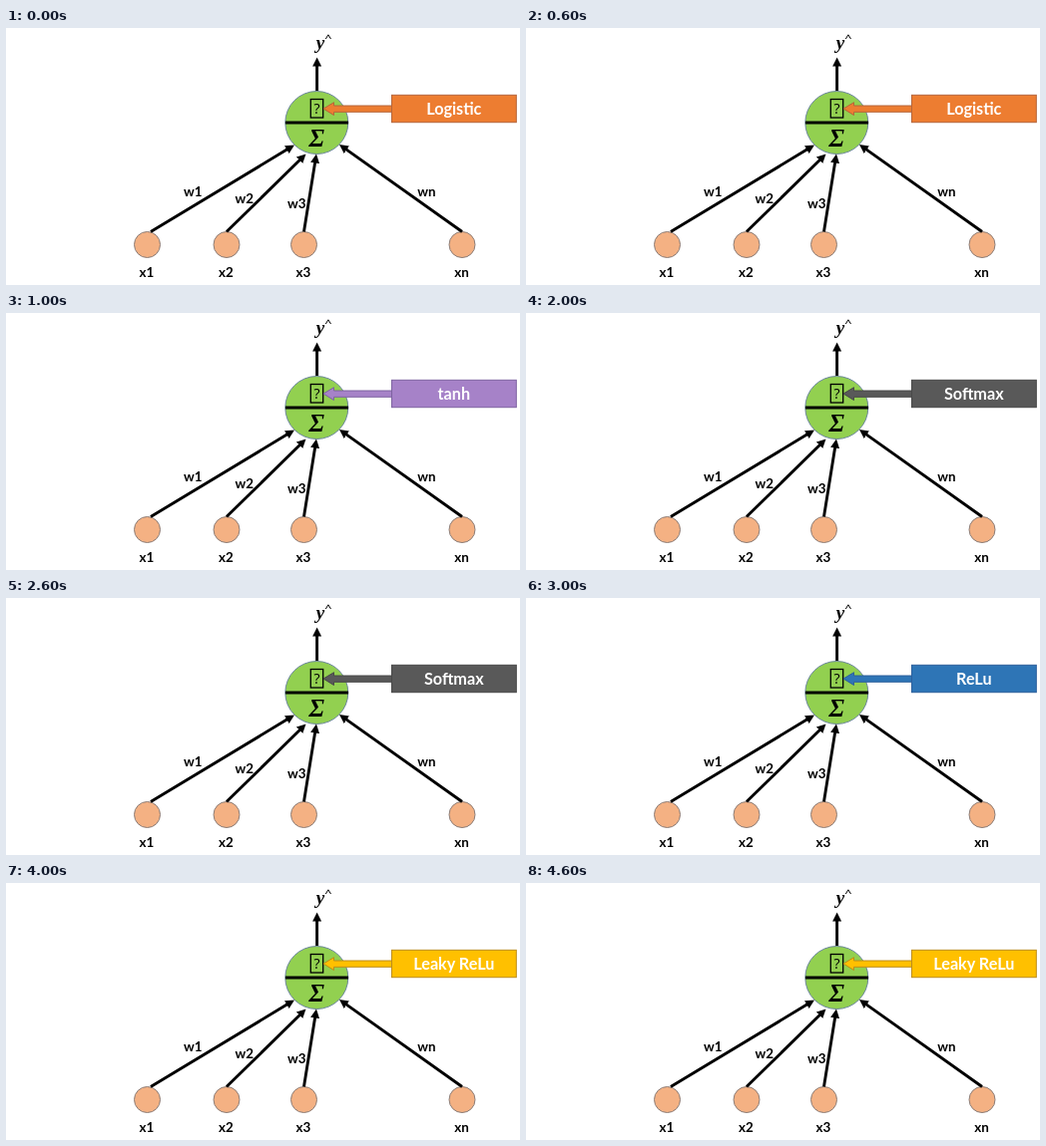
An HTML page that plays this animation: 515 by 258 pixels, repeating every 5000 ms.

```html
<!DOCTYPE html>
<html lang="en">
<head>
<meta charset="utf-8">
<title>Neuron activation functions</title>
<style>
  html, body { margin: 0; width: 100%; height: 100%; overflow: hidden; background: #fff; }
  svg { display: block; width: 515px; height: 258px; }
  text { font: 700 13.4px Lato, Carlito, sans-serif; text-anchor: middle; }
  .math { font: italic 700 19px "Liberation Serif", serif; }
  #label { font-size: 16.2px; fill: #fff; }
</style>
</head>
<body>
<svg viewBox="0 0 515 258">
  <defs>
    <marker id="head" markerUnits="userSpaceOnUse" markerWidth="10" markerHeight="10" refX="9" refY="5" orient="auto">
      <path d="M0 0.5L9 5L0 9.5z"/>
    </marker>
  </defs>

  <circle cx="311.3" cy="95" r="31.5" fill="#92d050" stroke="#6b8799"/>
  <path d="M280 95H343" stroke="#000" stroke-width="3"/>
  <g id="inputs" fill="#f4b183" stroke="#8b7d78"></g>
  <g id="arrows" stroke="#000" stroke-width="2.9"></g>
  <g id="names"></g>

  <text class="math" x="315" y="21">y</text>
  <path d="M320.3 11L322.9 6.8L325.5 11" fill="none" stroke="#000"/>
  <text class="math" x="311.3" y="119" style="font-size:25px">Σ</text>
  <rect x="305.3" y="71.5" width="12.4" height="18.5" fill="none" stroke="#000" stroke-width="1.3"/>
  <text x="311.5" y="86" style="font:400 14px 'Open Sans',sans-serif">?</text>

  <g id="callout">
    <path d="M318 81L328.5 74.7V78H386.5V84.3H328.5V87.5z"/>
    <rect x="386.5" y="67.3" width="124.8" height="27.4"/>
  </g>
  <text id="label" x="448.8" y="87"></text>
</svg>
<script>
const get = id => document.getElementById(id);

function add(parent, tag, attrs, text = "") {
  const node = document.createElementNS("http://www.w3.org/2000/svg", tag);
  for (const key in attrs) node.setAttribute(key, attrs[key]);
  node.textContent = text;
  get(parent).append(node);
}

const arrow = (x1, y1, x2, y2) => {
  // The shaft stops inside the head so that the tip stays sharp.
  const k = 5 / Math.hypot(x2 - x1, y2 - y1);
  add("arrows", "path", { d: `M${x1} ${y1}L${x2 - (x2 - x1) * k} ${y2 - (y2 - y1) * k}` });
  add("arrows", "path", { d: `M${x1} ${y1}L${x2} ${y2}`, stroke: "none", "marker-end": "url(#head)" });
};

// index, input x, arrow start x, arrow tip, weight label position
const inputs = [
  ["1", 141.5, 145, 289, 117.5, 187.3, 169],
  ["2", 221, 221, 300.5, 126.5, 238.8, 176],
  ["3", 298.5, 298.5, 311, 126.5, 291.3, 181],
  ["n", 457, 457, 334, 117, 421.3, 169]
];

for (const [id, x, startX, tipX, tipY, labelX, labelY] of inputs) {
  add("inputs", "circle", { cx: x, cy: 217.5, r: 13 });
  arrow(startX, 204.5, tipX, tipY);
  add("names", "text", { x: x - 0.5, y: 249.5 }, "x" + id);
  add("names", "text", { x: labelX, y: labelY }, "w" + id);
}
arrow(311.6, 63, 311.6, 29.5);

// label, fill, outline
const functions = [
  ["Logistic", "#ed7d31", "#b5653a"],
  ["tanh", "#a682c8", "#7d62a0"],
  ["Softmax", "#595959", "#484848"],
  ["ReLu", "#2e75b6", "#2c5f9c"],
  ["Leaky ReLu", "#ffc000", "#bc8c1a"]
];

let shown = -1;
function draw(now) {
  const i = Math.floor(now / 1000) % functions.length;
  if (i !== shown) {
    const [name, fill, stroke] = functions[shown = i];
    get("label").textContent = name;
    get("callout").setAttribute("fill", fill);
    get("callout").setAttribute("stroke", stroke);
  }
  requestAnimationFrame(draw);
}
draw(performance.now());
</script>
</body>
</html>
```
